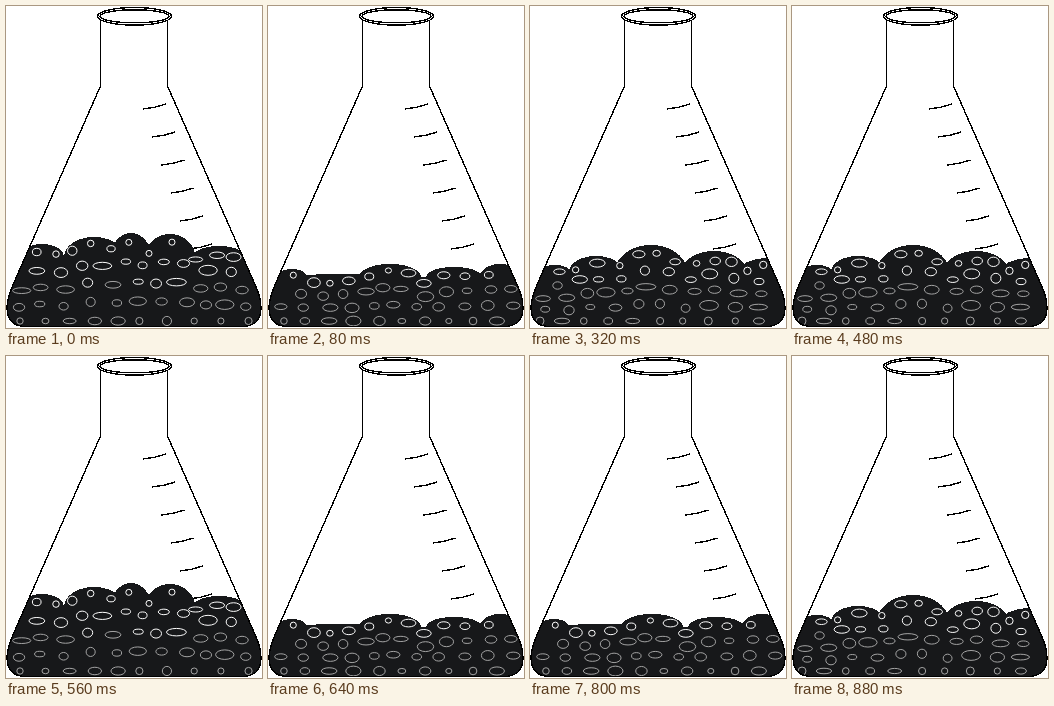
Write an HTML page that moves like this. It is 256 by 322 pixels and loops after 960 ms.

```html
<!DOCTYPE html>
<html lang="en">
<head>
<meta charset="utf-8">
<title>Bubbling flask</title>
<style>
  html, body { margin: 0; width: 100%; height: 100%; overflow: hidden; background: #fff; }
  svg { display: block; width: 256px; height: 322px; shape-rendering: crispEdges; }
  .ink { fill: none; stroke: #000; stroke-width: 1.4; }
  .pose { opacity: 0; }
  .pose path { fill: #17181a; }
  .pose ellipse { fill: none; shape-rendering: geometricPrecision; }
</style>
</head>
<body>
<svg viewBox="0 0 256 322">
  <defs>
    <path id="glass" d="M94.5 14V80L9.500 273C4 285 1 293 1 301C1 314 8 320.500 20 320.500H236C249 320.500 255 313 255 302C255 292 252 285 247 274L161.500 80V14"/>
    <clipPath id="inside"><use href="#glass"/></clipPath>
  </defs>
  <g id="marks" class="ink"></g>
  <g id="liquid" clip-path="url(#inside)"></g>
  <use href="#glass" class="ink"/>
  <g class="ink">
    <ellipse cx="128.500" cy="10.300" rx="37" ry="8.800"/>
    <ellipse cx="128.500" cy="10.300" rx="34.500" ry="6.500"/>
  </g>
</svg>
<script>
const STEP = 80;
const ORDER = [...'ABCACBCABABC'];
const FLOOR = 315;
const liquid = document.getElementById('liquid');
const marks = document.getElementById('marks');

function add(parent, tag, attrs) {
  const el = document.createElementNS('http://www.w3.org/2000/svg', tag);
  for (const key in attrs) el.setAttribute(key, attrs[key]);
  return parent.appendChild(el);
}

function seeded(seed) {
  return () => (seed = seed * 16807 % 2147483647) / 2147483647;
}

const mix = (p, q, t) => p + (q - p) * t;

// Distance of the slanted walls from the middle axis
const halfWidth = y => Math.min(33.5 + (y - 80) * 0.442, 126);

// Six graduations, evenly shifted along the right wall
for (let i = 0; i < 6; i++) {
  add(marks, 'path', { d: `M${137 + i * 9.2} ${103 + i * 28}q12 -1 23 -5` });
}

// Liquid surface: elliptic humps (centre, half width, top) above a base level
function surface(base, humps) {
  return x => Math.min(base, ...humps.map(([cx, w, top]) => {
    const u = (x - cx) / w;
    return base - (base - top) * Math.sqrt(Math.max(0, 1 - u * u));
  }));
}

// Rows of bubbles follow the surface and flatten out towards the floor
function addBubbles(g, level, rows, seed) {
  const rnd = seeded(seed);
  for (let r = 0; r < rows; r++) {
    const depth = r / (rows - 1);
    for (let x = 8 + rnd() * 8; x < 250; x += mix(15, 20, depth) + rnd() * 9) {
      const cy = mix(level(x) + 8, FLOOR, depth) + (rnd() - 0.5) * 4 * (1 - depth);
      const rx = 3 + 5 * rnd() ** 2 + 2 * Math.sin(depth * Math.PI);
      const ry = Math.min(rx, 2.5 + rnd() * 2.5);
      if (Math.abs(x - 128) + rx + 2 > halfWidth(cy)) continue;
      add(g, 'ellipse', { cx: x, cy, rx, ry, stroke: cy < 278 ? '#fff' : '#a4a4a4' });
    }
  }
}

function addPose(name, base, humps, rows, seed) {
  const g = add(liquid, 'g', { class: 'pose' });
  const level = surface(base, humps);
  let d = 'M0 322';
  for (let x = 0; x <= 256; x++) d += `L${x} ${level(x).toFixed(1)}`;
  add(g, 'path', { d: d + 'V322Z' });
  addBubbles(g, level, rows, seed);

  const frames = ORDER.map((p, i) => ({
    opacity: p === name ? 1 : 0,
    offset: i / ORDER.length,
    easing: 'steps(1, end)'
  }));
  frames.push({ opacity: frames[0].opacity, offset: 1 });
  const anim = g.animate(frames, { duration: STEP * ORDER.length, iterations: Infinity });
  anim.startTime = 0;
}

addPose('A', 251, [[36, 22, 238], [88, 30, 231], [125, 20, 227], [164, 25, 228], [213, 26, 240]], 5, 11);
addPose('B', 271, [[24, 15, 263], [70, 40, 268], [122, 31, 258], [186, 28, 261], [232, 20, 258]], 4, 23);
addPose('C', 266, [[25, 15, 259], [66, 27, 250], [121, 36, 239], [184, 32, 245], [240, 32, 252]], 5, 37);
</script>
</body>
</html>
```
